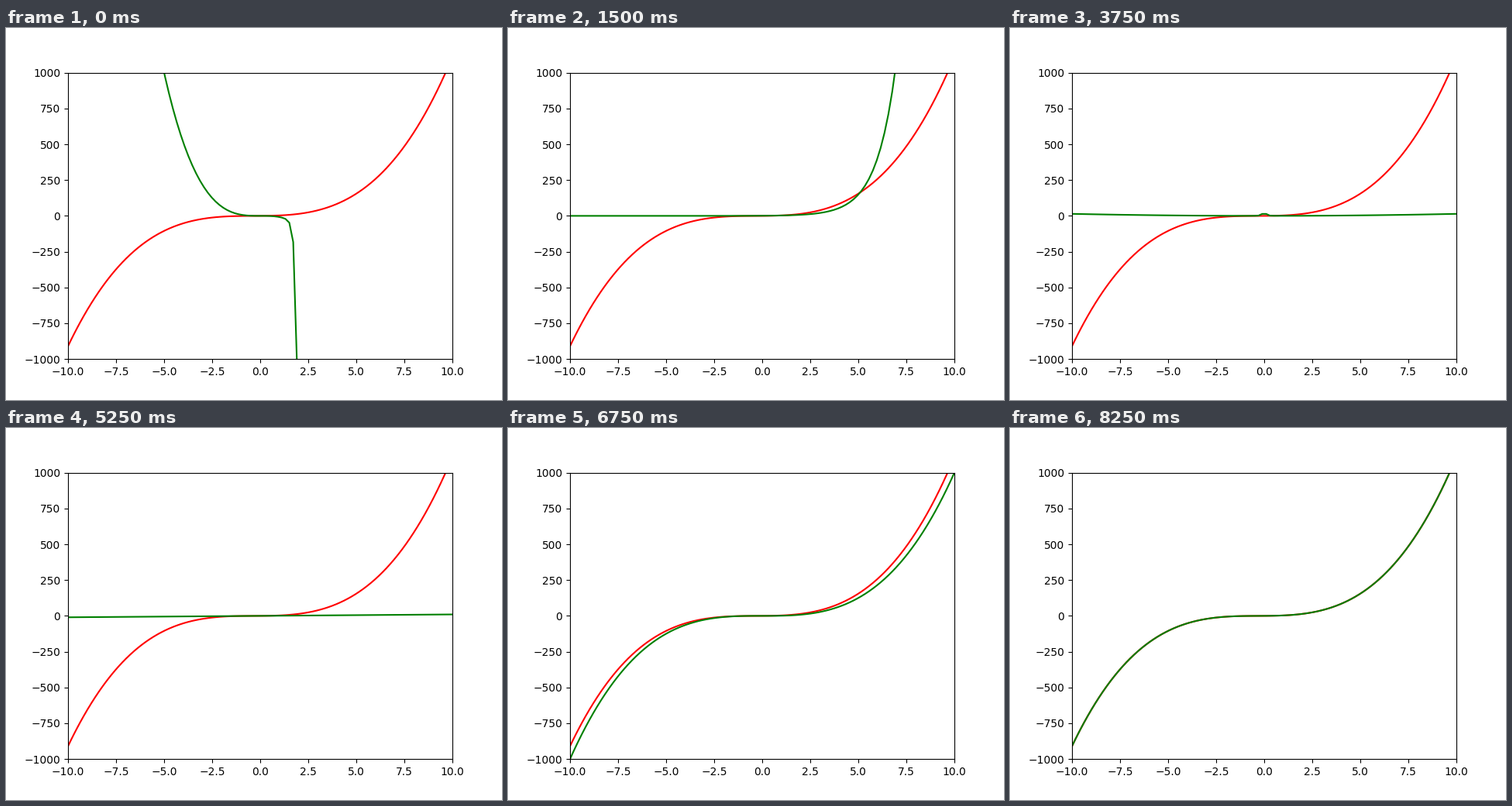
Recreate the animation shown at these times as a matplotlib script. Size 640x480 px, loop 9000 ms.

```python
import numpy as np
import matplotlib.pyplot as plt
from matplotlib.animation import FuncAnimation

STEP_MS = 750
x = np.linspace(-10, 10, 100)


def cubic(x):
    return x**3 + x**2 + x


# Successive best guesses of a search for the cubic.
GUESSES = [
    lambda x: -8 * x**3 - np.exp(9.7 * x - 11.7),
    lambda x: -9 * x**3 - np.exp(9.7 * x - 14.5),
    np.exp,
    lambda x: -np.e * x,
    np.cos,
    lambda x: 0.14 * (x**2 + 1 / x**2),
    np.sin,
    lambda x: x,
    lambda x: 4 * x,
    lambda x: x**3,
    lambda x: x**3 + x + np.log(x**2),
    cubic,
]

fig, ax = plt.subplots(figsize=(6.4, 4.8), dpi=100)
ax.set_xlim(-10, 10)
ax.set_ylim(-1000, 1000)
ax.plot(x, cubic(x), "r")
guess_line, = ax.plot(x, GUESSES[0](x), "g")


def draw(frame):
    guess_line.set_ydata(GUESSES[frame](x))
    return guess_line,


anim = FuncAnimation(fig, draw, frames=len(GUESSES), interval=STEP_MS,
                     repeat=True, repeat_delay=0)
plt.show()
```
